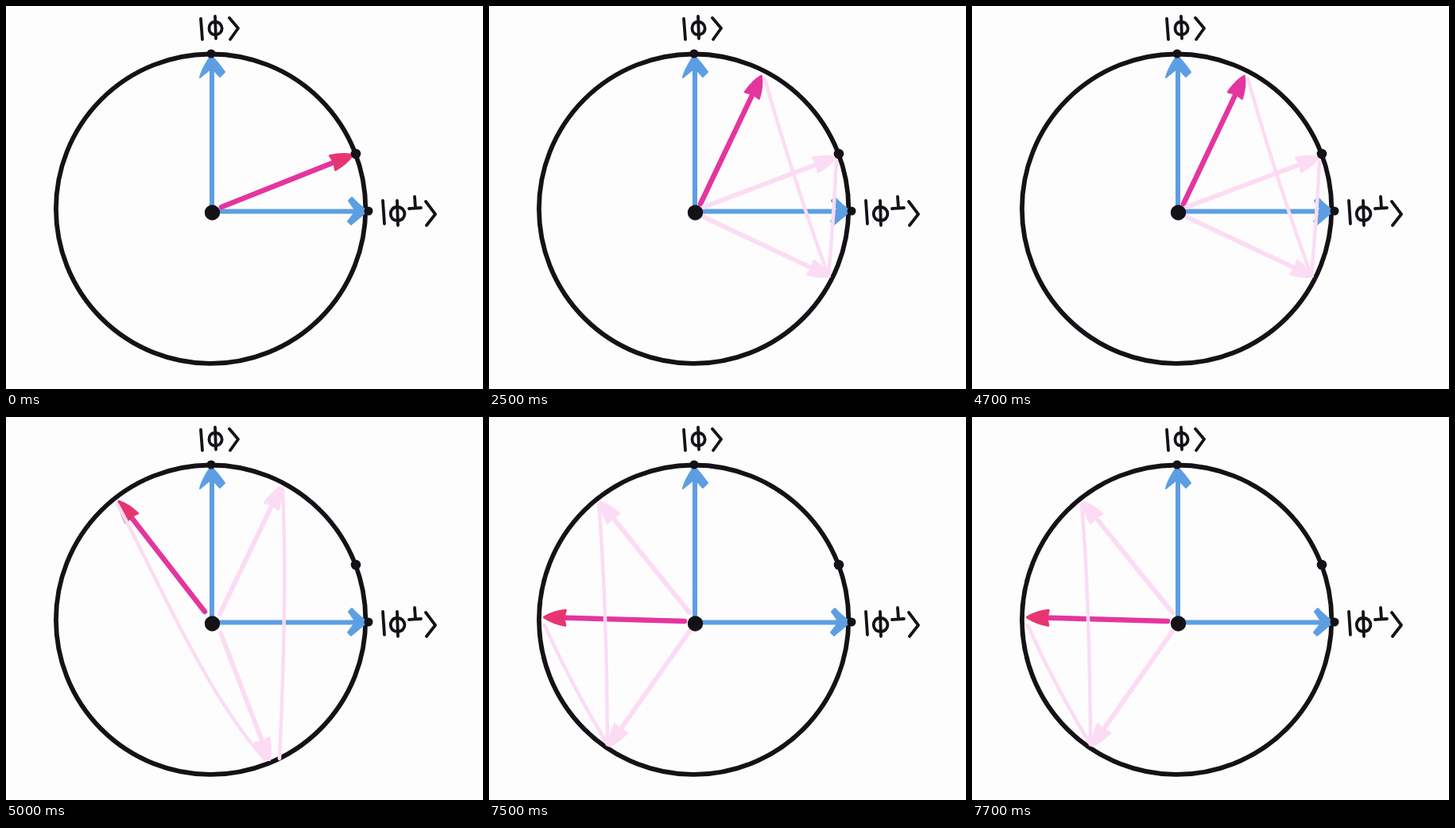
These frames come from a looping animation (600x482 px, 8000 ms). An HTML page:

```html
<!DOCTYPE html>
<html>
<head>
<meta charset="utf-8">
<style>
html, body { margin: 0; height: 100%; overflow: hidden; background: #fefdfe; }
svg { display: block; width: 100vw; height: 100vh; }
path, circle { fill: none; stroke-linecap: round; stroke-linejoin: round; }
.ink { stroke: #151217; }
.blue { stroke: #5d9ee3; stroke-width: 6; }
.head { fill: #5d9ee3; stroke: #5d9ee3; stroke-width: 2; }
.dot { fill: #151217; }
</style>
</head>
<body>
<svg viewBox="0 0 600 482">
  <circle class="ink" cx="257.6" cy="255.2" r="194.7" stroke-width="5.8"/>
  <path class="blue" d="M259 252V72M268 258.500H446"/>
  <path class="head" d="M258 62Q268 73 275 83L269 89L259 78Q251 84 244 90Q246 80 258 62Z"/>
  <path class="head" d="M454 258Q443 250 435 241L431 245L440 258L430 271L434 275Q444 267 454 258Z"/>
  <g id="vector"></g>
  <g id="trace"></g>
  <g>
    <circle class="dot" cx="259.5" cy="260" r="9.7"/>
    <circle class="dot" cx="258" cy="60" r="5.5"/>
    <circle class="dot" cx="440" cy="186" r="6.3"/>
    <circle class="dot" cx="456" cy="258" r="5.5"/>
  </g>
  <g class="ink" stroke-width="3.8" role="img" aria-label="|ϕ⟩ and |ϕ⊥⟩">
    <path d="M245 16L247 42M263 13L264 41M281 15L292 28L282 42"/>
    <path d="M263 20C253 20 253 36 263 36C275 36 274 20 263 20"/>
    <path d="M474 245L476 274M492 245L493 276M528 246L540 262L529 276"/>
    <path d="M492 253C481 253 481 270 492 270C505 270 504 253 492 253"/>
    <path d="M514 240L515 254M507 255L522 254"/>
  </g>
</svg>
<script>
const PALE = "#fcdcf4", PINK = "#e4359f", RED = "#e7366f";
const line = (d, color, width) =>
  `<path d="${d}" stroke="${color}" stroke-width="${width}"/>`;

function arrow([x1, y1, x2, y2], color, tip = color, width = 6) {
  const a = Math.atan2(y2 - y1, x2 - x1), c = Math.cos(a), s = Math.sin(a);
  const at = (back, side) => `${x2 - back * c - side * s} ${y2 - back * s + side * c}`;
  return line(`M${x1} ${y1}L${at(22, 0)}`, color, width) +
    `<path d="M${at(1.5, 0)}Q${at(12, 7)} ${at(28, 9.5)}L${at(26, 0)}` +
    `L${at(28, -9.5)}Q${at(12, -7)} ${at(1.5, 0)}Z" ` +
    `style="fill:${tip}" stroke="${tip}" stroke-width="3"/>`;
}

// Each pose: main vector, head colour, faded vectors, faded reflection lines.
const poses = [
  { start: 0, main: [271, 253, 437, 187], tip: RED, faded: [], lines: "" },
  { start: 2500, main: [266, 249, 343, 87], tip: PINK,
    faded: [[270, 253, 437, 190], [269, 265, 430, 341]],
    lines: "M347 92Q385 225 427 340M437 196Q434 260 427 340" },
  { start: 5000, main: [250, 245, 141, 105], tip: RED,
    faded: [[269, 248, 346, 87], [270, 272, 332, 433]],
    lines: "M348 90Q354 220 344 430M140 110C175 170 250 350 326 431" },
  { start: 7500, main: [246, 257, 68, 252], tip: RED,
    faded: [[252, 246, 139, 106], [252, 270, 150, 415]],
    lines: "M138 110Q148 230 149 412M70 262Q105 340 149 412" }
];

const trace = document.getElementById("trace");
const vector = document.getElementById("vector");
let shown;

function draw(now) {
  const t = now % 8000;
  const pose = poses.findLast(p => p.start <= t);
  if (pose !== shown) {
    trace.innerHTML = line(pose.lines, PALE, 4.5) +
      pose.faded.map(v => arrow(v, PALE)).join("");
    vector.innerHTML = arrow(pose.main, PINK, pose.tip, 6.5);
    shown = pose;
  }
  requestAnimationFrame(draw);
}
draw(0);
</script>
</body>
</html>
```
